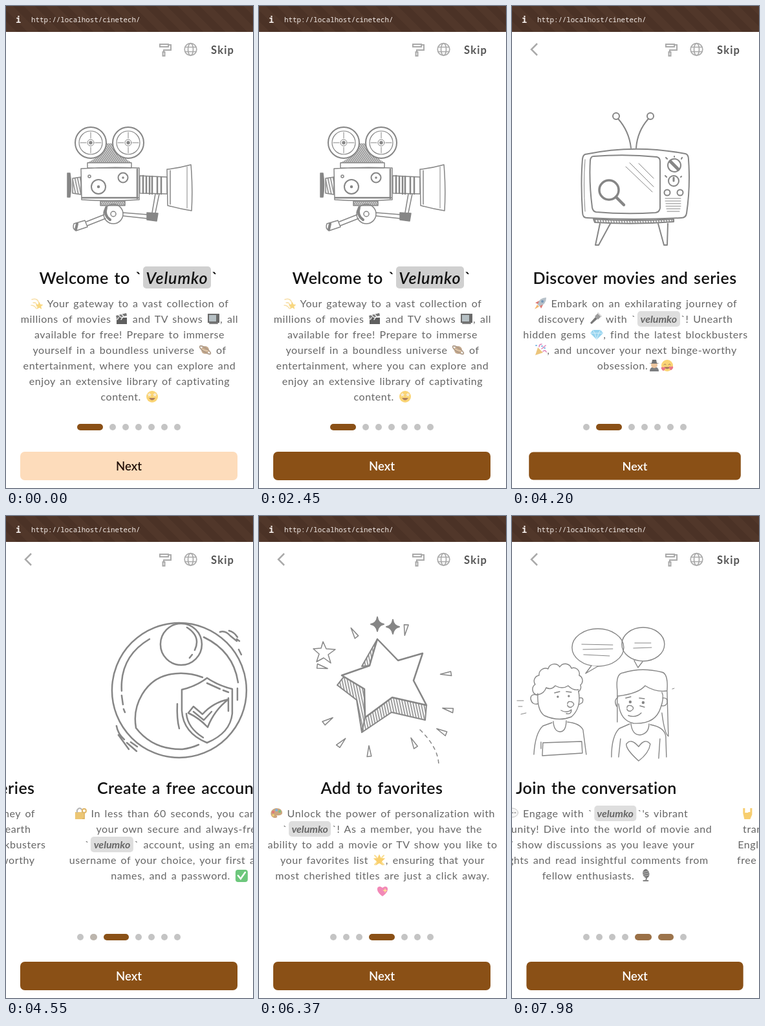
Recreate the animation shown at these times as an HTML page. Size 382 by 744 pixels, loop 8000 ms.

```html
<!DOCTYPE html>
<html lang="en">
<head>
<meta charset="utf-8">
<title>Onboarding</title>
<style>
  html, body { margin: 0; width: 100%; height: 100%; overflow: hidden; background: #fff; }
  #stage { position: relative; width: 382px; height: 744px; overflow: hidden; font: 16px Lato, sans-serif; color: #666; }
  #stage > *, .page > * { position: absolute; }
  .bar { inset: 0 0 auto; height: 40px; color: #f3ece8;
    background: repeating-linear-gradient(45deg, #51372a 0 12px, #4b3226 12px 24px); }
  .bar span { position: absolute; left: 39px; top: 0; font: 10.8px/41px "Noto Sans Mono", monospace; }
  .bar b { position: absolute; left: 15px; top: 0; font: bold 14px/41px "Noto Sans Mono", monospace; }
  .icons { left: 0; top: 40px; fill: none; stroke: #aaa; stroke-width: 2; }
  .skip { left: 317px; top: 56px; font: bold 16.5px/24px Lato, sans-serif; letter-spacing: 1.2px; color: #555; }
  #strip { left: 0; top: 0; }
  .page { position: absolute; top: 0; width: 380px; text-align: center; white-space: nowrap; }
  .page > svg { left: 0; top: 0; overflow: visible; fill: none; stroke: #868686; stroke-width: 2;
    stroke-linecap: round; stroke-linejoin: round; }
  .page h1 { left: 0; width: 380px; top: 402px; margin: 0; font: 600 25px/34px Lato, sans-serif;
    letter-spacing: .45px; word-spacing: 2px; color: #111; }
  .page p { left: -19px; width: 420px; top: 447px; margin: 0; line-height: 24px; letter-spacing: .58px; word-spacing: 2px; }
  em { display: inline-block; vertical-align: top; padding: 0 4.5px; margin: 0 2px; border-radius: 5px;
    background: #dedede; font-weight: bold; letter-spacing: 0; }
  h1 em { background: #d0d0d0; font-weight: 600; letter-spacing: .9px; margin: 0 1px; }
  .emoji { width: 20px; height: 20px; vertical-align: -4px; opacity: .72; }
  .dot { top: 645px; height: 10px; border-radius: 5px; }
  #next { left: 22px; top: 688px; width: 336px; height: 44px; border-radius: 7px; text-align: center;
    font: 600 18.5px/44px Lato, sans-serif; }
</style>
</head>
<body>
<div id="stage">
  <div class="bar"><b>i</b><span>http://localhost/cinetech/</span></div>
  <div id="strip"></div>
  <svg class="icons" width="382" height="54">
    <path id="back" d="M39 18l-9 9 9 9" stroke-width="2.5"/>
    <path d="M238 19h13v4h-13zM251 20h4v8h-11v4M242.500 31h3v6h-3z"/>
    <g stroke-width="1.7"><circle cx="285.500" cy="27" r="9.300"/><ellipse cx="285.500" cy="27" rx="4" ry="9.300"/>
    <path d="M277 23.500h17M277 30.500h17"/></g>
  </svg>
  <div class="skip">Skip</div>
  <div id="next">Next</div>
</div>
<script>
const path = (d, attrs = '') => `<path d="${d}" ${attrs}/>`;
const circle = (x, y, r, attrs = '') => `<circle cx="${x}" cy="${y}" r="${r}" ${attrs}/>`;
const oval = (x, y, rx, ry, attrs = '') => `<ellipse cx="${x}" cy="${y}" rx="${rx}" ry="${ry}" ${attrs}/>`;
const fill = c => `fill="${c}"`;
const line = (c, w) => `fill="none" stroke="${c}" stroke-width="${w}" stroke-linecap="round"`;
const HATCH = 'fill="url(#hatch)"', GREY = fill('#868686');

// Small inline icons, 20 by 20
const STAR = 'M10 1l2.700 6 6.500.6-5 4.300 1.600 6.500L10 15l-5.800 3.400 1.600-6.500-5-4.300 6.500-.6z';
const HEART = 'M10 18C-4 8 3-1 10 5C17-1 24 8 10 18z';
const face = circle(10, 10, 9, fill('#f9c440'));
const smile = path('M5 12q5 7 10 0z', fill('#8a4b20'));
const emoji = {
  '💫': path('M2 4q9-3 11 6M4 9q6-1 6 6M1 13q5 0 8 5', line('#f5d489', 1.500)) + path(STAR, fill('#f6c850') + ' transform="translate(7 7) scale(.65)"'),
  '🎬': path('M2 8h16v10H2z', fill('#222')) + path('M1 5l16-4 1 4L2 9z', fill('#444')) + path('M5 4l3 3M10 3l3 3M5 8l-2 3M11 8l-2 3', line('#eee', 1.500)),
  '📺': path('M1 2h18v14H1z', fill('#333')) + path('M3 4h11v10H3z', fill('#9aa9ae')) + path('M4 17h12', line('#555', 2)),
  '🪐': circle(10, 10, 6, fill('#b08860')) + path('M4 8q6 4 12 3', line('#d8b890', 2)) + oval(10, 10, 10, 3, line('#8d7258', 1.500) + ' transform="rotate(35 10 10)"'),
  '🤩': face + smile + path(STAR, fill('#f3e6c8') + ' transform="translate(2 3) scale(.38)"') + path(STAR, fill('#f3e6c8') + ' transform="translate(10.500 3) scale(.38)"'),
  '🚀': path('M19 1Q9 1 5 11l4 4Q19 11 19 1z', fill('#9aa8b4')) + path('M8 6L2 9l4 2zM14 12l-3 6-2-4z', fill('#d2453c')) + circle(13, 7, 2, fill('#3e6f9c')) + path('M5 12l-4 7 7-4z', fill('#f09a35')),
  '🔦': path('M2 16l8-9 3 3-9 8z', fill('#444')) + path('M9 6l5-5 5 5-5 5z', fill('#777')) + path('M14 1l5 5', line('#ccc', 2)),
  '💎': path('M4 3h12l4 5-10 10L0 8z', fill('#6cc3ea')) + path('M0 8h20M4 3l3 5 3 10 3-10 3-5', line('#c9ecfa', 1)),
  '🎉': path('M2 18l4-12 8 8z', fill('#e5b04b')) + path('M8 5q0-4 4-4M12 8l6-5M14 12q3-3 5 1', line('#d2559a', 1.600)) + path('M3 3h1M16 7h1M12 4h1', line('#4a9ddc', 2)),
  '🕵': path('M3 19q0-7 7-7t7 7z', fill('#4b4d50')) + circle(10, 9, 5, fill('#e6b07a')) + path('M2 7l4-1 1-5h6l1 5 4 1z', fill('#3b3c3e')),
  '🥰': face + smile + path('M5 9q2-3 3 0M12 9q2-3 3 0', line('#7a4420', 1)) + path(HEART, fill('#e2455a') + ' transform="translate(0 11) scale(.4)"') + path(HEART, fill('#e2455a') + ' transform="translate(12 10) scale(.4)"'),
  '🔐': path('M2 8h13v11H2z', fill('#e5b140')) + path('M5 8V5q4-6 8 0v3', line('#999', 2)) + circle(16, 6, 3, line('#d59a2b', 2)) + path('M16 9v9h-2', line('#d59a2b', 2)),
  '✅': '<rect x="1" y="1" width="19" height="19" rx="4" fill="#35b24a"/>' + path('M5 10l4 5 7-10', line('#fff', 2.500)),
  '🎨': path('M10 2C-2 3-1 18 9 17q4-1 1-4 7 1 9-3Q19 2 10 2z', fill('#b9854d')) + circle(5, 8, 2, fill('#d8453e')) + circle(10, 5, 2, fill('#4b8fd6')) + circle(15, 7, 2, fill('#4ca64c')) + circle(5, 13, 1.700, fill('#efc43c')),
  '🌟': path(STAR, fill('#f7bd35')) + path('M3 3l3 3M17 3l-3 3M3 17l3-3M17 17l-3-3', line('#f7d36c', 2)),
  '💖': path(HEART, fill('#ee5c9c')) + path('M14 5l1 3 3 1-3 1-1 3-1-3-3-1 3-1z', fill('#ffd76b')),
  '💬': oval(10, 9, 9, 7, 'fill="#f4f4f4" stroke="#aaa"') + path('M6 9h1M10 9h1M14 9h1', line('#888', 2)),
  '🎙': path('M7 18h7M11 17l1-5', line('#555', 2)) + oval(11, 7, 5, 7, fill('#444') + ' transform="rotate(-12 11 7)"') + path('M7 5l7-2M7 8l8-2M8 11l7-2', line('#aaa', 1)),
  '🤘': path('M5 19l-2-9V2h3v7h5v-1h3V2h3v10l-3 7z', fill('#f5bc3a')),
};

const ray = (x, y, angle) => path('M-3 8L0-10 4 7z', `transform="translate(${x} ${y}) rotate(${angle}) scale(.95)" stroke-width="1.600"`);
const sparkle = (x, y) => path(`M${x} ${y - 11}q1 9 10 11q-9 2-10 11q-1-9-10-11q9-2 10-11z`, GREY);
const reel = (x, y) => circle(x, y, 24, 'fill="#fff" stroke-width="2"') + circle(x, y, 18, 'stroke-width="1.200"') + circle(x, y, 5, 'stroke-width="1"') + circle(x, y, 2, GREY)
  + path(`M${x} ${y - 16}v9M${x} ${y + 7}v9M${x - 16} ${y}h9M${x + 7} ${y}h9`, 'stroke-width="1"');

const camera = `<g stroke-width="1.500">`
  + path('M140 234L154 212H166L180 232L194 242H126z', 'fill="url(#dense)" stroke="none"') + reel(131, 211) + reel(189, 211)
  + path('M126 242H194V250H126zM116 251Q160 248 206 250V299Q160 302 117 299z')
  + path('M118 296h86M203 252v45', 'stroke-width="2.500"')
  + circle(143, 279, 11, 'stroke-width="2"') + circle(143, 279, 1.500, GREY)
  + circle(181, 265, 7.500, 'stroke-width="2"') + circle(181, 265, 1, GREY) + circle(129, 263, 2)
  + path('M95 258h4q3 18 0 37h-4z', GREY) + path('M103 266l13-2v27l-13-2z', HATCH)
  + path('M207 262L249 264V290L207 289z') + path('M212 262v27M217 263v26M222 263v27M226 263v27M234 264v26M240 264v26', 'stroke-width="2.500"')
  + path('M249 252Q268 250 286 245Q289 280 287 316Q268 313 250 308zM254 254v52', 'fill="#fff"') + path('M280 248v64', 'stroke-width="1"')
  + path('M146 301H184V308H146z', 'fill="url(#dense)"') + circle(166, 321, 15) + circle(166, 321, 4) + path('M155 311q-4 12 6 19', 'stroke-width="4"')
  + path('M181 319L219 322M181 324L218 328M237 290L231 319M231 290L226 319M152 322L124 333M154 328L126 339')
  + path('M218 319l17 1-2 12-15-2z', GREY) + path('M105 336l17-5 4 10-18 6q-6-4-3-11z') + path('M110 336l-2 9', 'stroke-width="4"') + '</g>';

const television = circle(161, 170, 5) + circle(214, 170, 5) + path('M164 174Q181 193 184 219M211 174Q194 193 192 219')
  + path('M113 229Q190 213 268 228Q273 229 273 237Q276 280 270 320Q269 327 262 327Q190 331 116 327Q109 327 109 318Q106 272 109 236Q110 230 113 229z')
  + path('M126 232Q176 228 224 233Q229 234 229 240V312Q228 318 222 319Q175 322 130 318Q125 317 124 311Q119 272 121 238Q122 232 126 232z')
  + path('M176 248l41 39M182 242l37 37M196 243l23 23M113 237q-3 38 0 80M237 297h24M237 301h24M238 305h23M238 309h23M239 313h21M240 317h19', 'stroke-width="1"')
  + circle(150, 284, 15, 'stroke-width="3.500"') + path('M161 295l12 12', 'stroke-width="4.500"')
  + circle(251, 246, 10) + path('M245 240l12 12', 'stroke-width="5"') + circle(250, 270, 8) + path('M250 270v-5', 'stroke-width="3"')
  + path('M240 236l-2-2M251 233v-1M262 236l1-2M239 264l-2-2M261 264l1-1') + circle(240, 288, 4.500) + circle(260, 288, 4.500)
  + path('M126 329Q189 333 250 329V333Q189 338 128 334z', HATCH) + path('M136 336L129 369H134L152 336M226 336L235 369H240L241 336');

const account = '<g stroke-width="2.500">' + circle(191, 269, 104) + circle(194, 198, 32, 'fill="#fff"')
  + path('M203 172Q225 186 215 207M211 214l-4 5M145 190Q99 217 102 270M102 277l2 14M105 298l2 5M229 187q46 22 53 70M281 266v18')
  + path('M227 249Q200 239 174 245C139 253 118 291 124 326M124 327Q150 361 196 360Q210 358 221 353')
  + path('M234 250Q252 262 273 267V305Q270 335 234 350Q197 335 195 300V268Q217 263 234 250z', 'fill="#fff"')
  + path('M234 258l20 9M259 269l8 3M267 281v20M228 342Q204 327 202 305M188 290q-1 23 3 38')
  + path('M205 304L213 294L227 306Q243 288 267 283Q245 300 235 326Q222 312 205 304zM213 302l16 13 12-13')
  + path('M254 179q8-3 16 6l10 8M268 177q8 2 13 10M283 206l4 8M280 190l4 3M94 324q2 12 12 21M97 338l16 22M110 350l15 13M116 349l10 7') + '</g>';

const favorites = path('M183 190L159 232L171 231zM132 247L121 261L151 284L159 334L164 311L163 267zM259 292L257 315L205 303L159 334L164 311L206 280z', HATCH)
  + path('M183 190L215 223L253 212L239 254L259 292L206 280L164 311L163 267L128 246L171 231z', 'fill="#fff" stroke-width="2.500"')
  + ray(147, 181, -30) + ray(227, 175, 190) + ray(290, 244, -92) + ray(293, 299, -75) + ray(283, 333, -60) + ray(239, 351, -25)
  + ray(170, 364, 0) + ray(127, 350, 45) + ray(106, 316, 60) + ray(97, 233, 105)
  + path('M99 194l5 11 14 1-11 8 4 13-11-8-11 6 4-12-9-8 12-1z', 'stroke-width="1.500"') + sparkle(183, 167) + sparkle(207, 171)
  + path('M249 330Q278 358 278 386', 'stroke-width="1.500" stroke-dasharray="5 6"');

const chat = '<g transform="translate(59.500)" stroke-width="1.400">' + oval(133, 203, 40, 29) + oval(203, 198, 33, 26)
  + path('M123 231L114 243L133 232M189 223L195 234L202 225', 'fill="#fff"')
  + path('M108 198l48 1M110 206l46-1M111 214l40 2M190 196h25M188 204l28-1', 'stroke-width="1"')
  + path('M38 276a9 9 0 0 1-2-16a9 9 0 0 1 6-14a10 10 0 0 1 14-10a10 10 0 0 1 18-3a10 10 0 0 1 18 2a9 9 0 0 1 12 11a9 9 0 0 1 2 15a8 8 0 0 1-3 10')
  + path('M40 274Q39 300 50 308Q72 318 92 310Q108 296 103 270M40 276q10-2 13-11q8 4 14-3q11 6 20 0q8 8 16 6M39 276q-10-2-10 6q2 10 11 8M104 281q8-2 5 7l-5 3')
  + circle(71, 279, 1, GREY) + circle(88, 278, 1, GREY)
  + path('M66 273l8-2M84 271l8 1M86 290q0-5 7-3q6 4-1 8q-5 1-6-3M76 300q9 5 16-1q0 8-8 6')
  + path('M34 368Q36 335 48 324L62 319M64 317Q65 333 75 333Q84 332 84 316M86 318Q105 320 110 330L115 368M48 350L108 348L109 366L47 370zM45 349v10')
  + path('M8 285h10M10 294h6M14 306l8-2M248 267l3-1', 'stroke-width="1"')
  + path('M163 318V270Q160 243 172 242Q200 233 232 241Q242 243 240 270L242 340Q236 336 232 304M164 278Q196 274 206 262Q222 272 239 270')
  + path('M165 290Q168 316 188 320Q222 322 230 296Q236 280 232 272M164 280q-7 4-2 14M233 281q9-1 7 8q-3 5-8 4')
  + circle(183, 287, 1.500, GREY) + circle(203, 288, 1.500, GREY)
  + path('M176 281l8-2M197 281l8 1M178 296q0-5 7-3q6 4-1 8q-5 1-6-3M180 308q12 4 20-4M198 293l7 2')
  + path('M154 372Q154 340 166 328L182 321M184 320Q186 338 198 338Q212 336 212 321M214 322Q236 326 238 340L239 372M168 344l-3 28M229 344l-2 30')
  + path('M196 378Q176 360 177 352Q184 342 196 356Q206 342 214 352Q212 366 196 378') + '</g>';

const pages = [
  [camera, 'Welcome to `<em>Velumko</em>`', ['💫 Your gateway to a vast collection of', 'millions of movies 🎬 and TV shows 📺, all',
    'available for free! Prepare to immerse', 'yourself in a boundless universe 🪐 of', 'entertainment, where you can explore and',
    'enjoy an extensive library of captivating', 'content. 🤩']],
  [television, 'Discover movies and series', ['🚀 Embark on an exhilarating journey of', 'discovery 🔦 with `<em>velumko</em>`! Unearth',
    'hidden gems 💎, find the latest blockbusters', '🎉, and uncover your next binge-worthy', 'obsession.🕵🥰']],
  [account, 'Create a free account', ['🔐 In less than 60 seconds, you can open', 'your own secure and always-free',
    '`<em>velumko</em>` account, using an email, a', 'username of your choice, your first and last', 'names, and a password. ✅']],
  [favorites, 'Add to favorites', ['🎨 Unlock the power of personalization with', '`<em>velumko</em>`! As a member, you have the',
    'ability to add a movie or TV show you like to', 'your favorites list 🌟, ensuring that your',
    'most cherished titles are just a click away.', '💖']],
  [chat, 'Join the conversation', ["💬 Engage with `<em>velumko</em>`'s vibrant", 'community! Dive into the world of movie and',
    'TV show discussions as you leave your', 'thoughts and read insightful comments from', 'fellow enthusiasts. 🎙']],
  ['', 'Choose your language', ['🤘 Enjoy every page in your own words,', 'translated into many languages, such as',
    'English, French, Spanish and Arabic, all of', 'free choice for every one of our members']],
];

const PITCH = 380, LOOP = 8000;
const $ = id => document.getElementById(id);
const withIcons = text => text.replace(/\p{Extended_Pictographic}/gu, e => `<svg class="emoji" viewBox="0 0 20 20">${emoji[e]}</svg>`);
const hatching = (id, gap, angle) => `<pattern id="${id}" width="${gap}" height="4" patternUnits="userSpaceOnUse"
  patternTransform="rotate(${angle})"><path d="M1 0V4" stroke="#868686" stroke-width="1.600"/></pattern>`;

$('strip').innerHTML = `<svg width="0" height="0">${hatching('hatch', 4, -12)}${hatching('dense', 2.5, -35)}</svg>`
  + pages.map(([art, title, lines], i) => `<div class="page" style="left:${i * PITCH}px"><svg width="380" height="400">${art}</svg>
  <h1>${title}</h1><p>${withIcons(lines.join('<br>'))}</p></div>`).join('');

const dots = Array.from({ length: 7 }, () => {
  const dot = document.createElement('div');
  dot.className = 'dot';
  $('stage').append(dot);
  return dot;
});

// cubic-bezier(.4, 0, .2, 1)
function ease(x) {
  if (x <= 0) return 0;
  if (x >= 1) return 1;
  let lo = 0, hi = 1;
  for (let i = 0; i < 20; i++) {
    const s = (lo + hi) / 2, r = 1 - s;
    if (3 * r * r * s * .4 + 3 * r * s * s * .2 + s ** 3 < x) lo = s; else hi = s;
  }
  return 3 * lo * lo - 2 * lo ** 3;
}
const mix = (a, b, k) => `color-mix(in srgb, ${b} ${k * 100}%, ${a})`;

// [button pressed, released and page starts to slide]
const taps = [[2490, 2656], [3990, 4310], [5250, 5574], [6510, 6834], [7560, 7882]];
const BROWN = '#8a5016';

function draw(now) {
  const t = now % LOOP;
  const total = duration => taps.reduce((sum, [, start]) => sum + ease((t - start) / duration), 0);
  const active = total(290);
  $('strip').style.transform = `translateX(${-PITCH * total(465)}px)`;
  $('back').style.opacity = Math.min(1, active);

  let x = 110;
  dots.forEach((dot, i) => {
    const k = Math.max(0, 1 - Math.abs(active - i)), width = 10 + 30 * k;
    dot.style.left = x + 'px';
    dot.style.width = width + 'px';
    dot.style.background = mix('#c4c4c4', BROWN, Math.sqrt(k));
    x += width + 10;
  });

  const press = taps.reduce((sum, [down, up]) => sum + ease((t - down) / 150) - ease((t - up) / 150), 0);
  const hover = ease((t - 2150) / 250);
  $('next').style.transform = `scale(${1 - .025 * press})`;
  $('next').style.background = mix('#fddcbb', BROWN, hover);
  $('next').style.color = mix('#221008', '#fff', hover);
}

const begin = performance.now();
(function tick() {
  draw(performance.now() - begin);
  requestAnimationFrame(tick);
})();
</script>
</body>
</html>
```
